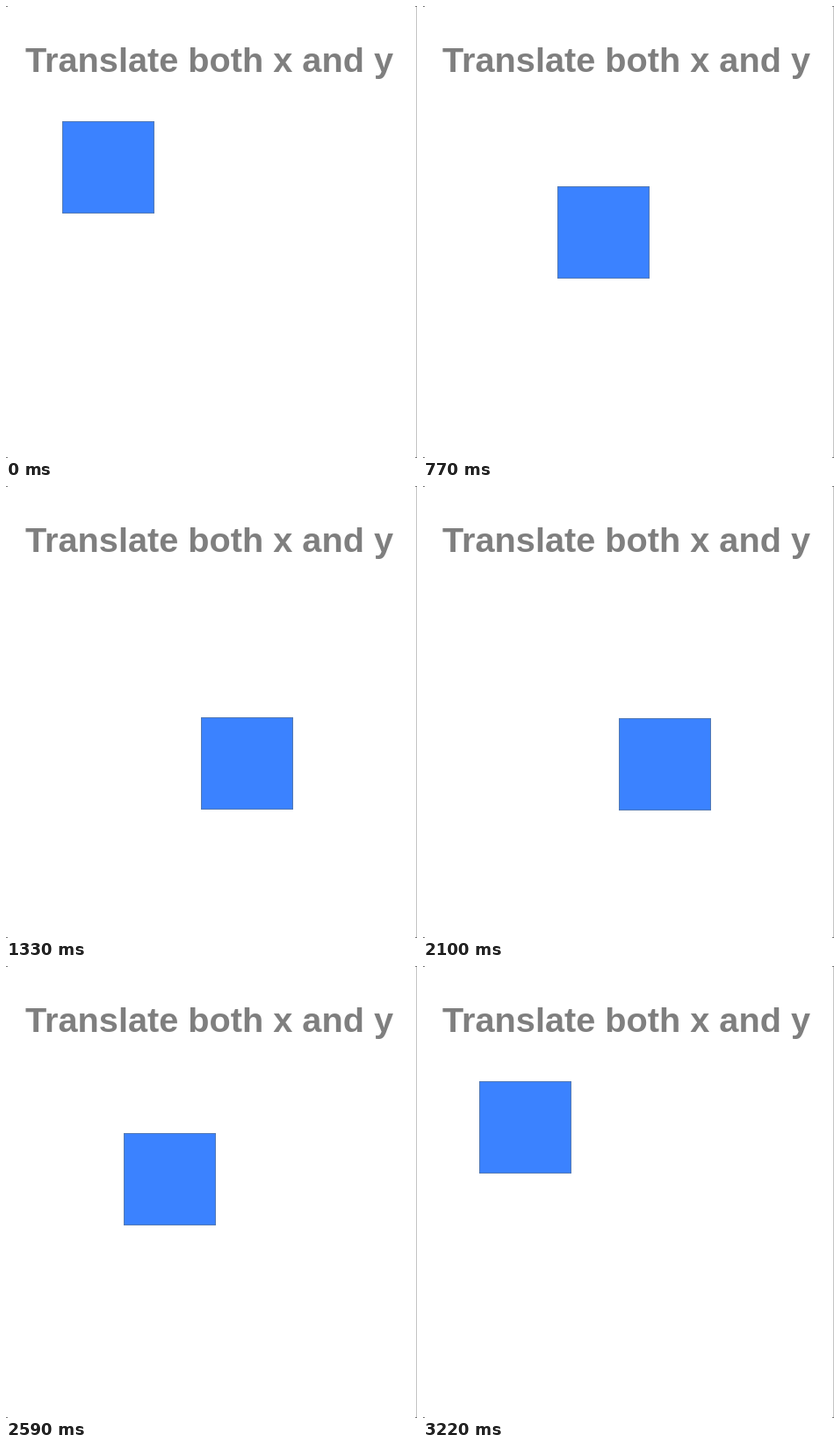
Recreate the animation shown at these times as an HTML page with a canvas. Size 468 by 514 pixels, loop 3.36 s.

```html
<!DOCTYPE html>
<html lang="en">
<head>
<meta charset="utf-8">
<title>Translate both x and y</title>
<style>
  html, body { margin: 0; width: 100%; height: 100%; overflow: hidden; background: #fff; }
  canvas { display: block; }
</style>
</head>
<body>
<canvas id="stage" width="468" height="514"></canvas>
<script>
const ctx = document.getElementById('stage').getContext('2d');
const WIDTH = 468, HEIGHT = 514;
const LOOP = 3360, STEP = 70;
const OUT_START = 583, BACK_START = 2403;
const FROM = { x: 64, y: 131 }, TO = { x: 223, y: 264 }, SIZE = 105;

// Critically damped spring, stiffness 100 and damping 20
function spring(ms) {
  const k = Math.max(0, ms) / 100;
  return 1 - (1 + k) * Math.exp(-k);
}

const mix = (a, b, p) => Math.round(a + (b - a) * p);

function drawWindow() {
  ctx.fillStyle = '#fff';
  ctx.fillRect(0, 0, WIDTH, HEIGHT);
  ctx.fillStyle = '#c4c4c4';
  ctx.fillRect(WIDTH - 1, 0, 1, HEIGHT);
  ctx.fillStyle = '#777';
  for (const x of [0, WIDTH - 2]) {
    for (const y of [0, HEIGHT - 1]) ctx.fillRect(x, y, 2, 1);
  }
}

function drawTitle() {
  ctx.font = 'bold 39.7px "Liberation Sans", Arial, sans-serif';
  ctx.fillStyle = '#7f7f7f';
  ctx.fillText('Translate both x and y', 22, 75);
}

function drawSquare(p) {
  const x = mix(FROM.x, TO.x, p), y = mix(FROM.y, TO.y, p);
  ctx.fillStyle = '#3b82ff';
  ctx.fillRect(x, y, SIZE, SIZE);
  ctx.strokeStyle = '#5279b4';
  ctx.lineWidth = 1;
  ctx.strokeRect(x + 0.5, y + 0.5, SIZE - 1, SIZE - 1);
}

function render(now) {
  const t = Math.floor((now % LOOP) / STEP) * STEP;
  drawWindow();
  drawTitle();
  drawSquare(spring(t - OUT_START) - spring(t - BACK_START));
  requestAnimationFrame(render);
}

render(0);
</script>
</body>
</html>
```
